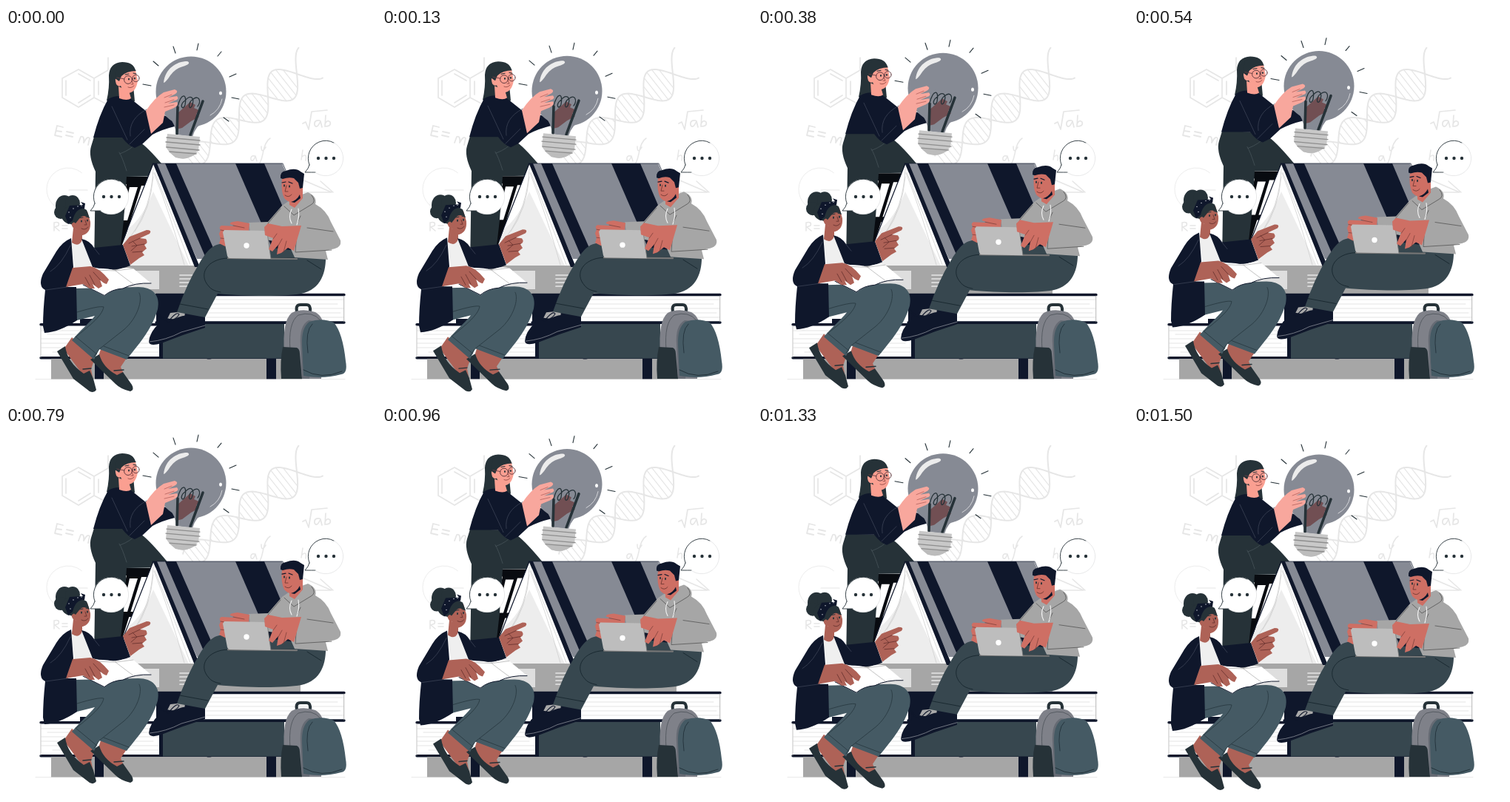
Animation, 500 px wide and 500 px high, one loop 1540 ms. Source, as an HTML page with a canvas:

```html
<!DOCTYPE html>
<html lang="en">
<head>
<meta charset="utf-8">
<title>Students sharing ideas</title>
<style>
html, body { margin: 0; width: 100%; height: 100%; overflow: hidden; background: #fff; }
canvas { display: block; width: 100vw; height: 100vh; }
</style>
</head>
<body>
<canvas id="stage" width="500" height="500"></canvas>
<script>
const canvas = document.getElementById('stage');
const ctx = canvas.getContext('2d');
const LOOP = 1540, LIFT = 9, LEAD = 20;
const NAVY = '#0f172b', DARK = '#263238', SLATE = '#37474f', STEEL = '#455a64',
  GLASS = '#868a94', GREY = '#a6a6a6', PALE = '#e6e6e6', BROWN = '#ae6257',
  TAN = '#ce6f64', PEACH = '#fa9f91', WHITE = '#fff', BLACK = '#080b10';

const paths = new Map();
function path(d) {
  if (!paths.has(d)) paths.set(d, new Path2D(d));
  return paths.get(d);
}
function fill(color, d) {
  ctx.fillStyle = color;
  ctx.fill(path(d));
}
function line(color, width, d) {
  ctx.strokeStyle = color;
  ctx.lineWidth = width;
  ctx.stroke(path(d));
}
function rect(color, x, y, w, h) {
  ctx.fillStyle = color;
  ctx.fillRect(x, y, w, h);
}
function oval(color, x, y, rx, ry = rx) {
  ctx.fillStyle = color;
  ctx.beginPath();
  ctx.ellipse(x, y, rx, ry, 0, 0, Math.PI * 2);
  ctx.fill();
}
function ring(color, width, x, y, r, from = 0, to = Math.PI * 2) {
  ctx.strokeStyle = color;
  ctx.lineWidth = width;
  ctx.beginPath();
  ctx.arc(x, y, r, from, to);
  ctx.stroke();
}

function drawHelix() {
  const at = (u, side) => {
    const v = side * (25 + u * 0.05) * Math.sin(Math.PI * u / 50);
    return [393 + 0.78 * u + 0.62 * v, 62 - 0.62 * u + 0.78 * v];
  };
  ctx.strokeStyle = PALE;
  ctx.lineWidth = 2;
  for (const side of [-1, 1]) {
    ctx.beginPath();
    for (let u = -190; u <= 25; u += 2) ctx.lineTo(...at(u, side));
    ctx.stroke();
  }
  ctx.lineWidth = 1.2;
  ctx.beginPath();
  for (let u = -186; u < -4; u += 7.6) {
    ctx.moveTo(...at(u, -1));
    ctx.lineTo(...at(u, 1));
  }
  ctx.stroke();
}

function drawNotes() {
  line(PALE, 1.7, 'M76 68L98 56L119 68V94L98 107L76 94ZM81 71V91M98 62L114 71M98 101L114 91M119 68L138 57V40M119 94L138 104M125 72V90');
  line(PALE, 1.8, 'M77 134L69 132L66 145L75 147M68 139L75 140M82 140L91 142M81 145L90 147M98 155L101 147Q106 145 105 155Q110 145 113 149L111 158');
  ring('#ededed', 1, 84, 218, 29, 1.2, 5.4);
  line(PALE, 1.2, 'M85 219H110');
  line(PALE, 1.6, 'M65 274V263Q73 261 71 267L66 269L72 274M76 267H83M76 271H83');
  line(PALE, 1.7, 'M401 129L405 127L409 137L413 113L434 111');
  line(PALE, 1.7, 'M424 125Q416 124 417 131Q420 137 425 126L427 134M432 118L431 133Q440 133 438 127Q434 123 431 130');
  line(PALE, 1.5, 'M336 173Q330 172 331 178Q334 182 337 173L339 180M345 160Q345 171 351 161M357 149Q350 153 347 170Q344 185 339 186');
  line(PALE, 1.5, 'M401 165L399 178M400 174Q407 168 405 179M398 204L440 222H400M425 207L442 222');
  drawHelix();
}

function drawThinker() {
  // Stool
  fill(BLACK, 'M155 201H197V213H183L156 300H143L163 211H155Z');
  fill(BLACK, 'M155 260H180V267H153Z');
  fill(WHITE, 'M167 215H178L164 260H157Z');
  // Trousers
  fill(DARK, 'M119 147L172 148L186 158Q200 170 224 200L163 201L159 260L152 322H119L121 194Q111 173 115 160Z');
  line('#4b585e', 0.7, 'M163 193Q157 174 153 168M154 170Q170 164 176 155');
  // Hair behind the shoulders
  fill(DARK, 'M136 98Q140 81 139 64Q140 47 157 46Q172 46 175 57L172 78L174 99L155 106Z');
  // Jacket
  fill(NAVY, 'M138 96Q152 88 169 96L189 112L193 109L213 118L228 123V133Q211 137 198 144L184 157L174 162Q165 159 157 148H118Q126 117 138 96Z');
  line('#424a5c', 0.7, 'M190 110Q165 123 168 146M143 106L164 151M167 157L187 137');
  // Face
  fill(PEACH, 'M152 79L153 95Q164 99 169 95L166 85Z');
  fill(PEACH, 'M151 64Q146 67 149 76Q152 80 155 78Q158 88 166 88Q176 86 178 71L175 57Q161 55 155 64Z');
  fill(DARK, 'M147 68L150 52Q166 45 176 58Q163 58 156 65L153 72Z');
  ring('#663e43', 1, 165, 70, 5.4);
  ring('#663e43', 1, 175.5, 68, 4.6);
  line('#663e43', 0.9, 'M150 67L160 69M170 69L172 68');
  oval(DARK, 166, 69, 1, 1.5);
  oval(DARK, 174, 68, 1, 1.5);
  line('#954c48', 0.9, 'M170 71L172 76L169 76M165 80Q169 82 173 78');
  line(DARK, 1.1, 'M161 63L166 62M172 61L176 62');
}

function drawBulb() {
  oval(GLASS, 250, 86, 47.5);
  fill(GLASS, 'M219 118Q229 130 230 144L252 147Q256 132 271 124Z');
  fill('#714f53', 'M232 115L249 100L256 104L254 108L263 112L257 116L261 120L250 126L238 135L230 137Z');
  fill('#ececec', 'M213 74C215 55 230 45 245 45C250 47 246 50 239 52C223 57 222 67 215 73Z');
  oval(WHITE, 290, 88, 2, 2.6);
  line('#d4d5d9', 1, 'M292 96Q289 111 276 118');
  line(DARK, 3.6, 'M232 107L231 143M266 99L249 145');
  line(DARK, 1.3, 'M232 106C237 87 245 88 242 104C239 113 233 104 242 98C249 89 256 94 251 106C247 112 245 101 253 96C261 90 264 99 259 106');
  // Screw cap
  fill('#c8c8c8', 'M218 143L262 147L260 166L253 170Q243 181 229 174L221 168L216 161Z');
  fill('#bcbcbc', 'M221 168L259 168Q246 180 229 175Z');
  line('#8e8e8e', 1.3, 'M217 148L262 152M216 154L262 158M217 161L261 165M221 167L257 170');
  // Hand and cuff
  fill('#f8a79d', 'M189 112Q201 94 213 87L228 83Q234 85 229 89L219 94L231 92Q235 96 228 98L219 102L231 100Q234 104 227 108L215 113L212 128L196 143Z');
  line('#a95853', 0.7, 'M214 94L224 90M215 101L227 97M214 107L227 104');
  line(DARK, 1.1, 'M199 45L206 51M226 25L229 34M260 21L258 30M291 32L286 38M311 62L302 66M315 96L305 94M301 126L294 121M185 76L196 78');
}

function drawBooks() {
  // Tent book
  rect(GREY, 143, 321, 255, 38);
  rect('#dedede', 164, 328, 43, 25);
  line(PALE, 1.7, 'M235 334H254M235 339H254M235 344H254M235 349H254');
  fill('#ededed', 'M199 184L146 321H258Z');
  fill(WHITE, 'M199 186L164 272Q184 258 199 221L229 284L247 321H258Z');
  line('#d0d0d0', 0.8, 'M199 190Q197 242 169 281M200 196Q222 252 241 320M201 195Q229 265 249 320M199 201Q195 246 174 275');
  line(NAVY, 1.2, 'M199 183L158 287');
  fill(GLASS, 'M200 183H373L423 300L400 312H258Z');
  fill(NAVY, 'M199 183H204L262 323H255Z');
  fill(NAVY, 'M215 183H230L287 313H271Z');
  fill(NAVY, 'M310 183H349L404 312H366Z');
  line(NAVY, 0.7, 'M198 183H374L424 300');
  // Middle book
  rect(WHITE, 264, 360, 193, 39);
  line('#d8d8d8', 0.7, 'M270 367H456M270 373H448M270 379H456M270 385H452M270 391H456');
  line(NAVY, 3.4, 'M203 360.5H457M203 398H457');
  line('#999', 0.7, 'M456.7 362V397');
  rect(NAVY, 203, 359, 64, 41);
  rect(NAVY, 100, 393, 20, 7);
  // Wide book
  rect(WHITE, 47, 400, 162, 47);
  line('#d8d8d8', 0.7, 'M48 409H207M56 414H207M48 420H207M48 426H199M48 432H207M63 438H207');
  rect(SLATE, 212, 400, 164, 47);
  rect(NAVY, 207, 399, 5, 48);
  line(NAVY, 3.4, 'M47 400.8H210M47 445.7H210');
  line('#aaa', 0.7, 'M47 402V445');
  line(NAVY, 1, 'M210 399.5H378M210 447H378');
  // Base book
  rect(GREY, 61, 447, 291, 28);
  rect(GREY, 365, 447, 35, 28);
  rect(NAVY, 120, 447, 12, 28);
  rect(NAVY, 352, 447, 13, 28);
  fill(NAVY, 'M271 447H278Q274 448 271 447Z');
  line('#dedede', 0.7, 'M40 474.6H458');
}

function drawReader() {
  // Ankles and shoes
  fill(BROWN, 'M89 418L78 434L104 469L118 477L115 461L120 446Z');
  fill(DARK, 'M69 437L80 430Q83 452 105 467L113 463L118 474L122 489Q119 494 113 491L91 474Z');
  line(DARK, 1.4, 'M104 461L115 460');
  fill(BROWN, 'M129 431L123 450L143 467L162 474L155 458L163 446Z');
  fill(DARK, 'M114 448L126 441Q131 459 150 469L158 465L170 482Q174 489 168 491Q155 488 148 481Z');
  line(DARK, 1.4, 'M146 463L159 462');
  // Trousers
  fill(STEEL, 'M91 352L179 350C198 350 209 361 205 380C197 409 176 431 163 448L126 434L119 448L89 422C101 408 113 398 120 389L92 396Z');
  line('#26363e', 0.8, 'M96 384Q126 375 132 377C130 390 108 406 95 417M180 358C185 367 178 392 159 408L126 434L119 444M94 417L123 441M132 430L166 443');
  // Shirt and neck
  fill('#efefef', 'M87 287L105 284L119 324L93 324Z');
  fill(BROWN, 'M91 270L89 290Q99 297 103 286V276Z');
  // Jacket
  fill(NAVY, 'M88 284Q76 289 68 302L50 332Q44 346 50 352L53 354Q50 382 50 403L52 412Q72 411 96 395L95 350L83 350L91 323Z');
  fill(NAVY, 'M102 285Q113 287 119 297L158 293L168 321Q145 331 117 323Z');
  line('#424a5c', 0.7, 'M87 294Q75 320 60 329M54 354L83 350M118 296L126 306');
  // Head
  oval(DARK, 79, 240, 12, 14);
  oval(DARK, 90, 237, 10, 11);
  oval(DARK, 74, 249, 9, 9);
  oval(DARK, 88, 253, 13, 12);
  fill(BROWN, 'M91 255Q86 259 89 267Q91 272 95 272Q98 282 105 279.5Q115 276 114 262L110 248L97 247Z');
  fill(DARK, 'M88 266L84 252Q96 237 109 246L113 257Q104 250 98 259L94 264Q91 260 88 266Z');
  fill(NAVY, 'M80 254L86 240L104 239L101 235L107 237L106 244Q94 243 90 260L84 265Z');
  for (const [x, y] of [[85, 249], [91, 244], [97, 241], [87, 256], [102, 240]]) oval('#d8dae0', x, y, 0.7);
  oval(DARK, 102, 261, 1, 1.6);
  oval(DARK, 110, 260, 1, 1.6);
  line(DARK, 1, 'M98 257L104 256M108 255L112 256');
  line('#68332f', 0.9, 'M107 260L109 266L106 266M102 271Q107 274 111 269');
  // Pointing hand
  fill(BROWN, 'M158 293L167 282L190 273Q198 273 194 278L181 284L189 285Q193 290 187 293L190 298L184 303L187 307L180 311L168 320Z');
  line('#642f2d', 0.8, 'M166 291L181 284M170 295L187 292M171 303L184 302M171 288L177 294L169 301');
  // Book and resting hand
  fill(WHITE, 'M104 347L116 325Q137 324 148 328Q159 322 172 325L196 345Q174 344 158 352Q143 353 133 362Z');
  line(NAVY, 1, 'M104 347L133 361.5Q143 353 158 352Q174 344 196 345');
  line('#a8a8a8', 0.7, 'M148 328Q162 339 172 346M120 327L148 328L172 325');
  fill(BROWN, 'M90 324L114 322Q126 324 139 340L136 346Q131 345 127 340L130 349L125 352L117 346L120 352L113 352L104 346L81 350Z');
  line('#642f2d', 0.8, 'M118 330L128 341M113 334L120 347M107 337L113 348');
}

function drawCoder() {
  // Shoe and legs
  fill('#aaa', 'M222 385L242 383L241 394L218 393Z');
  fill(NAVY, 'M207 399Q208 389 217 392L226 394Q244 384 269 390L269 405L239 415L210 426Q194 431 193 424Q194 411 207 399Z');
  line('#9a9da5', 0.7, 'M194 424Q216 422 237 411L269 402');
  line(NAVY, 1.1, 'M214 395Q203 380 206 390L219 397Q231 382 234 387Q231 393 219 397');
  fill(SLATE, 'M297 291C278 291 271 302 260 320Q244 346 231 384L269 391L286 359C326 363 378 363 399 359C426 353 433 330 432 306L352 296Z');
  line('#14222a', 0.8, 'M390 311H300C272 312 259 333 274 349Q278 355 290 357M235 373L273 380M431 310L416 309M407 314L426 326');
  // Hoodie
  fill(GREY, 'M328 263L354 262L373 240L389 229L408 222Q421 228 418 238Q433 246 439 262L452 287Q454 297 440 299L432 301L435 313L390 310L382 292L331 282Z');
  line('#555', 0.8, 'M376 241L389 253L412 239Q420 235 413 226M407 270L442 275M440 300L391 303L393 276M354 264L371 244M398 254L394 263');
  line('#f5f5f5', 1.1, 'M386 245Q381 255 386 264M395 244Q397 254 393 266');
  // Head
  fill(TAN, 'M383 229V239L390 243L401 230V214Z');
  fill(TAN, 'M373 203Q371 220 376 230Q384 239 392 232L398 218Q404 211 398 207L395 200Z');
  fill(NAVY, 'M371 203Q370 194 378 193Q391 188 398 194L403 197L401 216L397 217L395 209L389 203Q382 201 374 204Z');
  fill(NAVY, 'M385 235Q393 233 397 225L398 230L390 236Z');
  oval(DARK, 376, 213, 1, 1.7);
  oval(DARK, 383, 214, 1, 1.7);
  line(NAVY, 1.2, 'M373 209L378 208M382 208L387 210');
  line('#713833', 0.9, 'M379 213L377 221L381 221M377 226Q382 230 386 225');
  // Hands and laptop
  fill(TAN, 'M329 264L313 261Q301 262 303 265L312 268L291 267Q287 269 290 273L288 278L290 285L288 291L296 295L327 284Z');
  line('#763a36', 0.7, 'M290 273L302 275M290 284L299 285M307 267L322 270');
  line('#777', 2.2, 'M300 311L393 312');
  fill('#bdbdbd', 'M295 273L350 274Q352 274 353 277L358 312L302 311Q300 311 299 308L293 276Z');
  line('#777', 0.8, 'M350 274Q352 274 353 277L358 312H393');
  oval(WHITE, 325, 294, 3.7);
  fill(TAN, 'M349 269L354 264L373 268L399 267L389 301L381 297L372 304L366 306L368 293L360 302L355 299L361 284L350 280Z');
  line('#763a36', 0.7, 'M361 285L366 278M368 294L373 285M375 303L379 288');
}

function drawBackpack() {
  line(DARK, 4, 'M393 383Q391 374 398 374H406Q412 374 411 383');
  fill('#7f8189', 'M376 439Q373 396 386 385Q400 378 418 384Q429 390 430 407L426 474H380Z');
  line('#4c5258', 0.8, 'M384 435Q381 398 395 388Q414 382 425 395');
  fill(DARK, 'M374 431L393 432Q397 434 397 440L400 474H372Q370 450 374 431Z');
  fill('#666b74', 'M398 428Q396 402 409 395L420 396L410 474H400Z');
  fill(STEEL, 'M400 428Q399 405 410 397Q427 391 443 398Q455 412 459 450Q462 467 453 468Q428 475 402 470Z');
  line('#22313a', 0.9, 'M408 439Q404 409 414 400');
  line('#23323a', 1, 'M402 462Q426 476 454 464');
}

function drawBubble(x, y) {
  const tail = `M${x - 22} ${y + 9}Q${x - 23} ${y + 14} ${x - 28} ${y + 19}Q${x - 18} ${y + 19} ${x - 14} ${y + 19}`;
  oval(WHITE, x, y, 24);
  fill(WHITE, tail);
  line(DARK, 0.9, tail);
  ring(DARK, 0.9, x, y, 23.7, 2.75, 5.2);
  ring('#d7d9db', 0.6, x, y, 23.7, 5.2, 8.5);
  for (const dx of [-10, 0.5, 11]) oval(DARK, x + dx, y, 2.2);
}

function floating(dy, ...draws) {
  ctx.save();
  ctx.translate(0, dy);
  draws.forEach(draw => draw());
  ctx.restore();
}

function render(now) {
  const phase = ((now + LEAD) % LOOP) / LOOP;
  const dy = -LIFT * (1 - Math.cos(phase * Math.PI * 2)) / 2;
  const scale = window.devicePixelRatio || 1;
  const w = Math.round(innerWidth * scale), h = Math.round(innerHeight * scale);
  if (canvas.width !== w || canvas.height !== h) {
    canvas.width = w;
    canvas.height = h;
  }
  ctx.setTransform(w / 500, 0, 0, h / 500, 0, 0);
  ctx.lineCap = ctx.lineJoin = 'round';
  rect(WHITE, 0, 0, 500, 500);
  drawNotes();
  floating(dy, drawThinker, drawBulb);
  drawBooks();
  floating(dy, drawCoder, drawReader);
  drawBackpack();
  drawBubble(142, 228);
  drawBubble(432, 176);
}

const start = performance.now();
function tick() {
  render(performance.now() - start);
  requestAnimationFrame(tick);
}
tick();
</script>
</body>
</html>
```
